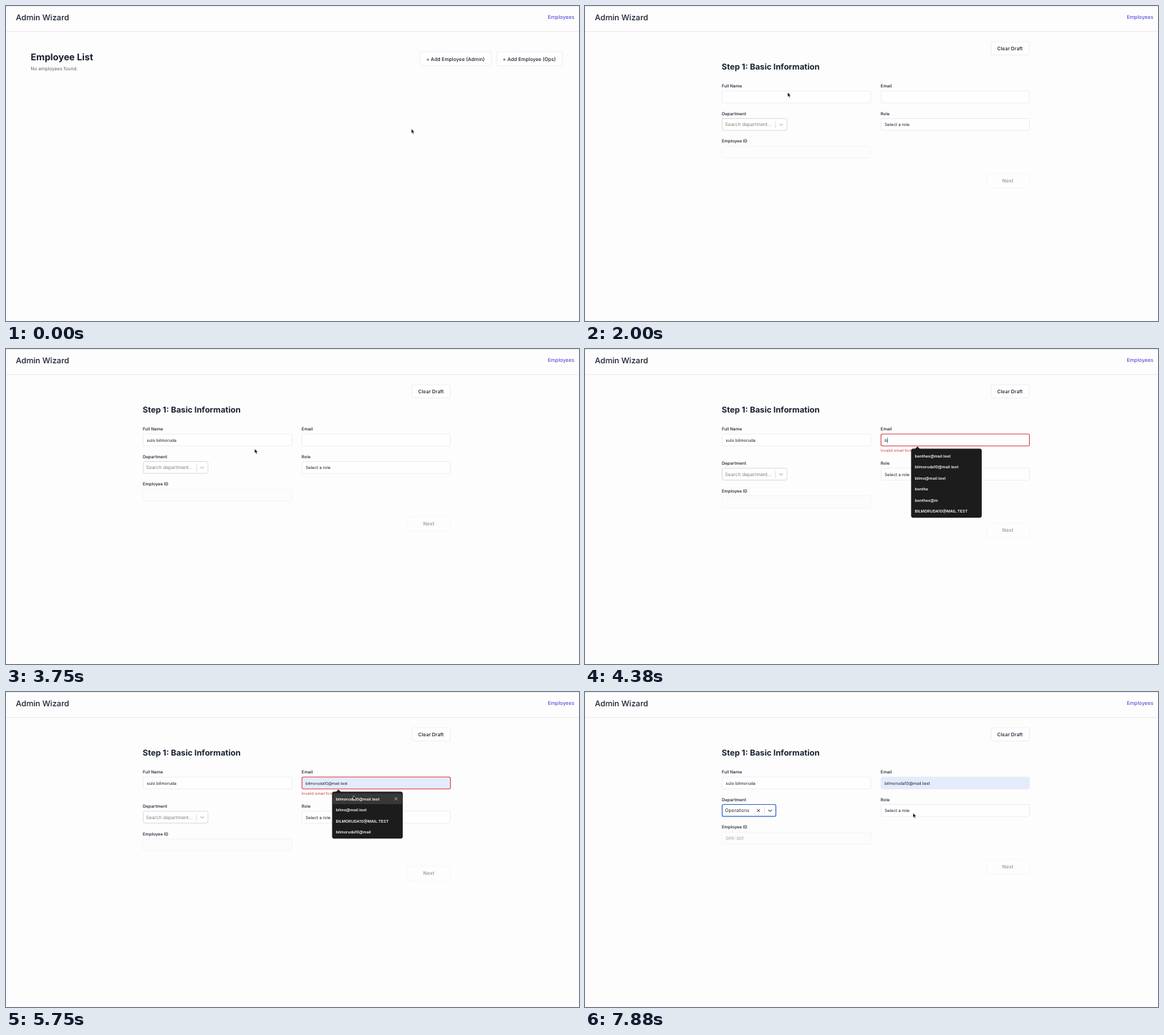
Recreate the animation shown at these times as an HTML page. Size 800 by 441 pixels, loop 8000 ms.

```html
<!DOCTYPE html>
<html lang="en">
<head>
<meta charset="utf-8">
<title>Admin Wizard</title>
<style>
  html, body { margin: 0; width: 100%; height: 100%; overflow: hidden; background: #fdfdfd; }
  svg { display: block; width: 800px; height: 441px; font-family: Inter, Roboto, sans-serif; }
  text { white-space: pre; text-rendering: geometricPrecision; }
</style>
</head>
<body>
<svg id="stage" viewBox="0 0 800 441"></svg>
<script>
const LOOP = 8000;
const INK = '#18202f', LINE = '#e3e5e9', MUTED = '#8f9399', RED = '#d8484b', FOCUS = '#747a83';
const NAMES = ['sulo', 'suloqwer', 'SULO', 'sulokfghdkfgh', 'suloee', 'sulo bilmoruda'];
const MAILS = ['benthex@mail.test', 'bilmoruda10@mail.test', 'bilmo@mail.test',
  'benthe', 'benthex@m', 'BILMORUDA10@MAIL.TEST'];
const MAILS_FILTERED = [MAILS[1], MAILS[2], MAILS[5], 'bilmoruda10@mail'];

// Each step changes part of the page state.
const STEPS = [
  [0, { page: 'list', hover: false, focus: '', name: '', email: '', dept: '', names: [], mails: [],
        error: false, filled: false, menu: '', id: '' }],
  [880, { hover: true }],
  [1500, { page: 'form' }],
  [2250, { focus: 'name' }],
  [2500, { name: 's', names: NAMES }],
  [2750, { name: 'su' }],
  [2880, { name: 'sul' }],
  [3000, { name: 'sulo' }],
  [3130, { name: 'sulo b', names: [NAMES[5]] }],
  [3630, { name: NAMES[5], names: [], focus: '' }],
  [4130, { focus: 'email' }],
  [4250, { email: 'b', mails: MAILS, error: true }],
  [4500, { email: 'bi', mails: MAILS_FILTERED }],
  [4630, { email: 'bil' }],
  [5880, { email: MAILS[1], mails: [], error: false, filled: true, focus: '' }],
  [6630, { focus: 'dept', menu: 'No options' }],
  [6880, { dept: 'o', menu: 'Operations' }],
  [7000, { dept: 'op' }],
  [7380, { dept: 'Operations', menu: '', id: 'OPE-001' }],
];

// Pointer keys: time, x, y, shape.
const PATH = [
  [0, 566, 172, 'arrow'], [500, 628, 88, 'arrow'], [630, 628, 88, 'arrow'],
  [880, 634, 78, 'hand'], [1000, 636, 76, 'hand'], [1380, 636, 76, 'hand'],
  [1500, 630, 80, 'arrow'], [2130, 240, 126, 'beam'], [2500, 240, 128, ''],
  [3250, 242, 132, 'beam'], [3380, 252, 150, 'arrow'], [3630, 256, 150, 'arrow'],
  [3880, 450, 128, 'beam'], [4250, 450, 128, ''], [5000, 456, 132, 'beam'],
  [5250, 474, 170, 'arrow'], [5750, 485, 145, 'arrow'], [6130, 485, 145, 'arrow'],
  [6630, 241, 168.5, 'arrow'], [6880, 241, 168.5, ''], [7130, 238, 172, 'arrow'],
  [7250, 230, 186, 'arrow'], [7380, 230, 186, 'arrow'], [7880, 458, 169.5, 'arrow'],
];

const measure = document.createElement('canvas').getContext('2d');
const widthOf = (str, size) => {
  measure.font = '100px Inter, Roboto, sans-serif';
  return measure.measureText(str).width * size / 100;
};

// The y of a label is the middle of its capitals.
const label = (x, y, size, str, fill = INK, weight = 400) =>
  `<text x="${x}" y="${y + size * 0.364}" font-size="${size}" font-weight="${weight}" fill="${fill}">${str}</text>`;

const box = (x, y, w, h, stroke = LINE, fill = '#fefefe', line = 0.6, r = 2.2) =>
  `<rect x="${x}" y="${y}" width="${w}" height="${h}" rx="${r}" fill="${fill}" stroke="${stroke}" stroke-width="${line}"/>`;

const stroke = (d, color, width = 0.6) =>
  `<path d="${d}" fill="none" stroke="${color}" stroke-width="${width}"/>`;

const caret = (x, y, str = '', size = 6) => {
  const cx = x + widthOf(str, size) + 0.4;
  return stroke(`M${cx} ${y - 3.7}v7.4`, '#111', 0.6);
};

function header() {
  return stroke('M0 .4H800', '#e2e2e4', 0.8) + stroke('M0 35.7H800', '#e4e5e8', 0.8) +
    label(13.8, 16, 11.1, 'Admin Wizard', INK, 500) +
    label(756.5, 15.7, 7.1, 'Employees', '#564fdc', 500);
}

function listPage(s) {
  const first = s.hover ? ['#8088d0', '#f3f5fb', 0.8] : [LINE, '#fefefe', 0.6];
  return label(34.4, 71.5, 12.85, 'Employee List', INK, 700) +
    label(34.5, 87.2, 6.52, 'No employees found.', '#5b6068') +
    box(578, 64, 99.7, 20, ...first, 3.2) +
    label(586.7, 74, 6.88, '+ Add Employee (Admin)', INK, 500) +
    box(685, 64, 92, 20, LINE, '#fefefe', 0.6, 3.2) +
    label(693.6, 74, 6.88, '+ Add Employee (Ops)', INK, 500);
}

function suggestions(x, w, rows, hovered) {
  if (!rows.length) return '';
  const tip = x + 8.8;
  let out = `<path d="M${tip - 4} 140.5l4 -4 4 4z" fill="#1c1c1c"/>` +
    `<rect x="${x}" y="139.6" width="${w}" height="${rows.length * 15.5 + 3.6}" rx="3" fill="#1c1c1c"/>`;
  rows.forEach((row, i) => {
    const y = 149.5 + i * 15.5;
    if (i === hovered) {
      out += `<rect x="${x + 1}" y="${y - 7.7}" width="${w - 2}" height="15.3" rx="2" fill="#373737"/>` +
        stroke(`M${x + w - 11.4} ${y - 2}l4 4m0 -4l-4 4`, '#ddd', 0.7);
    }
    out += label(x + 5.2, y, 5.5, row, '#f4f4f4', 600);
  });
  return out;
}

function department(s, y) {
  const chosen = s.id !== '', active = s.focus === 'dept';
  const w = chosen ? 75 : 90.5, right = 191.5 + w, mid = y + 8.8;
  const dark = active ? '#555' : '#bfbfbf';
  let out = box(191.5, y + 0.3, w, 16.6, active ? '#3c6dcc' : '#cfcfcf', '#fefefe', active ? 1.2 : 0.7);
  out += label(195.6, mid, 6.55, s.dept || 'Search department...', s.dept ? '#333' : '#808080');
  if (active && !chosen) out += caret(195.6, mid, s.dept, 6.55);
  if (chosen) out += stroke(`M240.2 ${mid - 2}l4 4m0 -4l-4 4`, '#444', 1);
  return out + stroke(`M${right - 16} ${y + 4}v9.8`, '#ccc', 0.6) +
    stroke(`M${right - 10.6} ${mid - 1.2}l2.5 2.5l2.5 -2.5`, dark, 1.1);
}

function menu(text) {
  if (!text) return '';
  const empty = text === 'No options';
  return box(191, 178, 91.5, 20.3, 'none', '#00000012', 0, 2.5) +
    box(191.5, 177.6, 90.5, 20, '#dcdcdc', '#fff', 0.5, 2) +
    (empty ? '' : '<rect x="191.7" y="180" width="90" height="15.5" fill="#deebff"/>') +
    label(empty ? 219.7 : 197.5, 187.8, 6.55, text, empty ? '#999' : '#333');
}

function formPage(s, pointer) {
  const shift = s.error ? 9.4 : 0;
  const row = pointer.shape === 'arrow' ? Math.floor((pointer.y - 141.5) / 15.5) : -1;
  const namePick = s.names[row], mailPick = s.mails[row];
  const nameOn = s.focus === 'name', mailOn = s.focus === 'email';
  const mailLine = s.error ? [RED, 1.1] : mailOn ? [FOCUS, 1.1] : [LINE, 0.6];
  const blue = '#e4ebfc';

  let out = box(567, 50, 53.5, 18.4, LINE, '#fefefe', 0.6, 2.6) +
    label(575.6, 59.3, 6.88, 'Clear Draft', INK, 500) +
    label(190.8, 85, 11.35, 'Step 1: Basic Information', INK, 700);

  out += label(191, 112, 6, 'Full Name', INK, 500) +
    box(191.4, 119, 207.8, 16.8, nameOn ? FOCUS : LINE, namePick ? blue : '#fefefe', nameOn ? 1.1 : 0.6) +
    label(196.6, 127.8, namePick ? 5.5 : 5.95, namePick || s.name);
  if (nameOn && !namePick) out += caret(196.6, 127.8, s.name, 5.95);

  out += label(412.8, 112, 6, 'Email', INK, 500) +
    box(413.2, 119, 207.3, 16.8, mailLine[0], s.filled || mailPick ? blue : '#fefefe', mailLine[1]) +
    label(418.3, 127.8, mailPick ? 5.5 : 5.95, mailPick || s.email);
  if (mailOn && !mailPick) out += caret(418.3, 127.8, s.email, 5.95);
  if (s.error) out += label(412.8, 141.8, 5.5, 'Invalid email format', RED);

  out += `<g transform="translate(0 ${shift})">` +
    label(191, 150.6, 6, 'Department', INK, 500) + department(s, 157.2) +
    label(412.8, 150.6, 6, 'Role', INK, 500) +
    box(413.2, 157.5, 207.3, 16.8) + label(418.3, 166, 5.95, 'Select a role') +
    label(191, 189.2, 6, 'Employee ID', INK, 500) +
    box(191.4, 196.2, 207.8, 16.6, '#eeeff1', '#fcfcfc') + label(196.6, 205, 6, s.id, '#9a9ea5') +
    box(560.7, 234.5, 59.8, 20, '#f0f1f3', '#fdfdfd', 0.6, 2.6) +
    label(582.6, 244.5, 6.88, 'Next', MUTED, 500) + menu(s.menu) + '</g>';

  return out + suggestions(233.6, 67.2, s.names, row) + suggestions(455.3, 98.6, s.mails, row);
}

function drawPointer({ x, y, shape }) {
  const shapes = {
    arrow: '<path d="M0 0v6.2l1.4 -1.2 1 2.3 1.1 -.5 -1 -2.2h1.9z" fill="#000" stroke="#fff" stroke-width=".5"/>',
    hand: '<path d="M-.8 .4q.7 -.8 1.2 .1v2.2l2 .5q.9 .3 .8 1.3l-.5 2.9h-3.6l-2 -2.6q0 -.9 .8 -.6l1.3 .7z"' +
      ' fill="#fff" stroke="#222" stroke-width=".7"/>',
    beam: stroke('M-1.2 -3.5q1.2 0 1.2 1v5q0 1 -1.2 1M1.2 -3.5q-1.2 0 -1.2 1m0 5q0 1 1.2 1', '#222', 0.6),
  };
  return shape ? `<g transform="translate(${x} ${y})">${shapes[shape]}</g>` : '';
}

function pointerAt(t) {
  const i = PATH.findLastIndex(key => key[0] <= t);
  const [t0, x0, y0, shape] = PATH[i];
  const [t1, x1, y1] = PATH[i + 1] || [LOOP, x0, y0];
  const p = (t - t0) / (t1 - t0), e = p * p * (3 - 2 * p);
  return { x: x0 + (x1 - x0) * e, y: y0 + (y1 - y0) * e, shape };
}

const stateAt = t => Object.assign({}, ...STEPS.filter(step => step[0] <= t).map(step => step[1]));

const tickTime = k => Math.round(k * 12.5) * 10;
const stage = document.getElementById('stage');
let shown = -1;

function frame() {
  const t = performance.now() % LOOP;
  let k = Math.floor(t / 125);
  if (tickTime(k) > t) k--;
  if (k !== shown) {
    shown = k;
    const now = tickTime(k), s = stateAt(now), pointer = pointerAt(now);
    stage.innerHTML = header() + (s.page === 'list' ? listPage(s) : formPage(s, pointer)) + drawPointer(pointer);
  }
  requestAnimationFrame(frame);
}
frame();
</script>
</body>
</html>
```
